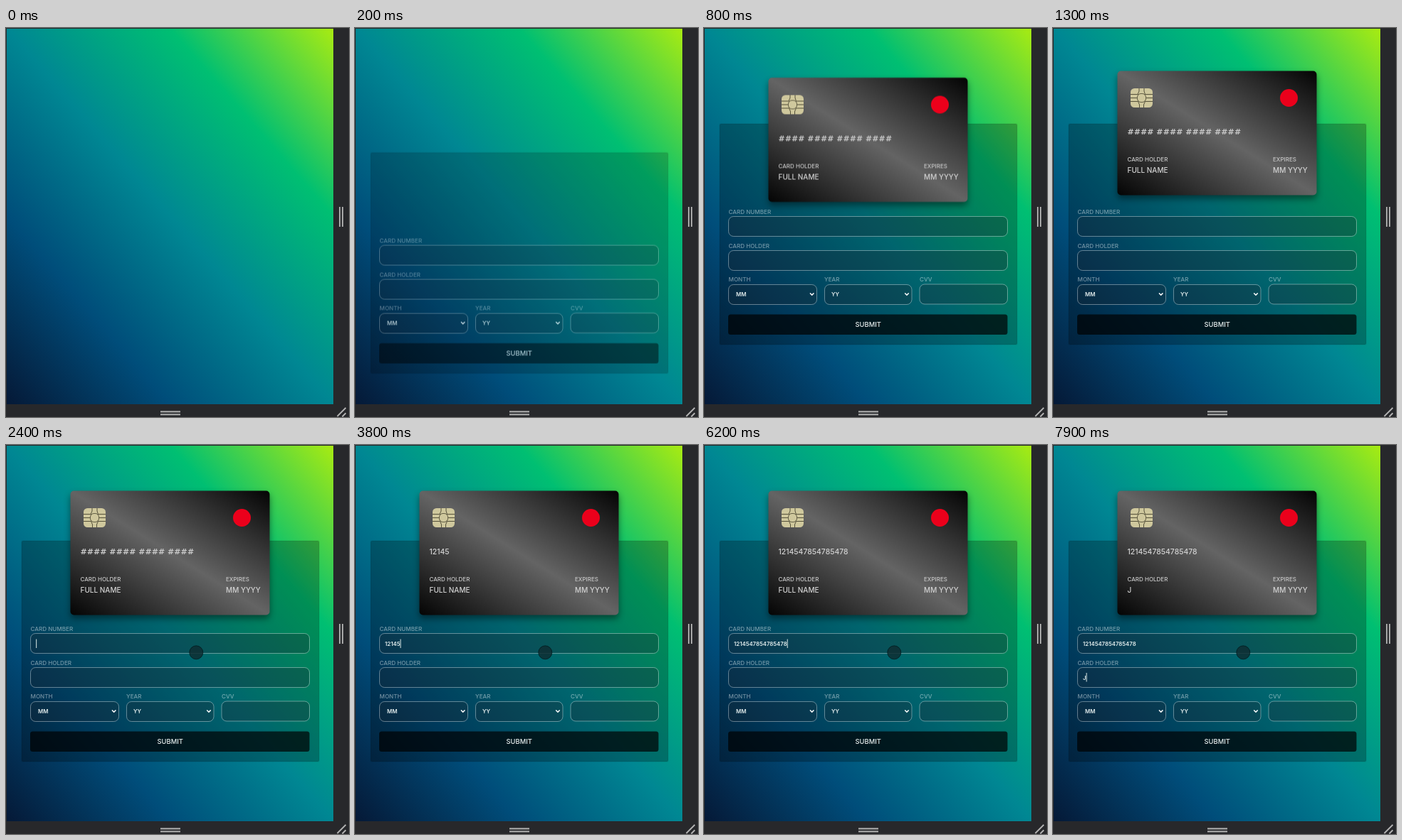
An HTML page that plays this animation: 482x548 px, repeating every 8000 ms.

```html
<!DOCTYPE html>
<html lang="en">
<head>
<meta charset="utf-8">
<title>Card form</title>
<style>
  html, body { margin: 0; width: 100%; height: 100%; overflow: hidden; background: #27282b; }
  svg { display: block; width: 482px; height: 548px; font-family: Inter, sans-serif; font-weight: 500; }
  #card { animation: drop 8s infinite; }
  #form { animation: rise 8s infinite; }
  #pointer { animation: point 8s step-end infinite; }
  .plate { filter: drop-shadow(0 5px 5px rgba(0, 0, 0, .45)); }
  .panel { fill: rgba(0, 0, 0, .25); stroke: rgba(0, 0, 0, .06); stroke-width: 2; }
  .field { fill: rgba(27, 38, 49, .3); stroke: rgba(255, 255, 255, .38); }
  .label { font-size: 8.1px; fill: rgba(255, 255, 255, .45); }
  .tag { font-size: 8px; fill: #c8c8c8; }
  .value { font-size: 10px; fill: #d2d2d2; }
  .input { font-size: 7.8px; font-weight: 600; fill: #e4eeee; }
  .hashes { font: bold 11.05px "DejaVu Sans", sans-serif; fill: #c9c9c9; }
  .digits { font-size: 10.4px; fill: #d2d2d2; }
  .arrow { fill: none; stroke: #fff; stroke-width: 1.6; }
  .grip { fill: none; stroke: #b4b4b4; stroke-width: 1.8; }

  @keyframes drop {
    0%, 2% { transform: translateY(-310px); opacity: .8; animation-timing-function: linear; }
    6.25% { transform: translateY(-159.5px); opacity: .9; animation-timing-function: cubic-bezier(.3, .5, .5, 1); }
    10% { transform: translateY(5.5px); opacity: 1; animation-timing-function: ease-in-out; }
    16.25% { transform: translateY(-4px); animation-timing-function: ease-in-out; }
    21.5%, 100% { transform: none; opacity: 1; }
  }
  @keyframes rise {
    0%, .5% { transform: translateY(150px); opacity: 0; animation-timing-function: cubic-bezier(.2, .6, .35, 1); }
    6.25% { transform: translateY(3.5px); opacity: .96; animation-timing-function: ease-out; }
    9%, 100% { transform: none; opacity: 1; }
  }
  @keyframes point {
    0% { visibility: hidden; }
    24.5%, 100% { visibility: visible; }
  }
</style>
</head>
<body>
<svg viewBox="0 0 482 548">
  <defs>
    <linearGradient id="sky" x1="0" y1="1" x2="1" y2="0">
      <stop offset="0" stop-color="#051937"/>
      <stop offset=".25" stop-color="#004d7a"/>
      <stop offset=".5" stop-color="#008793"/>
      <stop offset=".75" stop-color="#00bf72"/>
      <stop offset="1" stop-color="#a8eb12"/>
    </linearGradient>
    <linearGradient id="metal" x1="0" y1="1" x2="1" y2="0">
      <stop offset="0" stop-color="#040404"/>
      <stop offset=".5" stop-color="#646464"/>
      <stop offset="1" stop-color="#040404"/>
    </linearGradient>
    <clipPath id="view"><rect x="1" y="1" width="459" height="529"/></clipPath>
  </defs>

  <rect width="482" height="548" fill="#27282b"/>
  <g clip-path="url(#view)">
    <rect x="1" y="1" width="459" height="529" fill="url(#sky)"/>

    <g id="form">
      <rect class="panel" x="22" y="135" width="418" height="311" rx="2"/>
      <text class="label" x="34.5" y="262">CARD NUMBER</text>
      <rect class="field" x="34.5" y="265.5" width="392" height="28" rx="7"/>
      <text class="label" x="34.5" y="310">CARD HOLDER</text>
      <rect class="field" x="34.5" y="313.5" width="392" height="28" rx="7"/>
      <text class="label" x="34.5" y="357">MONTH</text>
      <rect class="field" x="34.5" y="361.5" width="124" height="28" rx="7"/>
      <text class="label" x="169" y="357">YEAR</text>
      <rect class="field" x="169.5" y="361.5" width="122.5" height="28" rx="7"/>
      <text class="label" x="303" y="357">CVV</text>
      <rect class="field" x="303" y="361" width="123.5" height="28" rx="7"/>
      <text class="input" x="45" y="378">MM</text>
      <text class="input" x="179" y="378">YY</text>
      <path class="arrow" d="M149 373.5l2.7 2.7 2.7-2.7M282.300 373.5l2.7 2.7 2.7-2.7"/>
      <rect x="34" y="403.500" width="392.500" height="28.500" rx="3.500" fill="rgba(0,0,0,.7)"/>
      <text x="230.700" y="421" text-anchor="middle" font-size="9.4" fill="#e8eeee">SUBMIT</text>
      <text class="input" id="numberInput" x="42" y="283"></text>
      <text class="input" id="holderInput" x="42" y="330.500"></text>
      <rect id="caret" width="1.200" height="12.500" fill="#b9cccd"/>
    </g>

    <g id="card">
      <rect class="plate" x="90.500" y="64.500" width="280" height="175" rx="5" fill="url(#metal)"/>
      <g fill="#cfc89d" stroke="#55513a" stroke-width="1">
        <rect x="109" y="89" width="31" height="27" rx="5.500" stroke="none"/>
        <path fill="none" d="M109 97.500h10.500M109 107.500h10.500M129.500 97.500H140M129.500 107.500H140M109 102.500h9M131 102.500h9M121 89v4l-2 4.500M128 89v4l1.500 4.500M119.500 107.500l2 4.500v4M129.500 107.500l-2 4.500v4"/>
        <rect x="118.500" y="96.500" width="12" height="12" rx="5"/>
      </g>
      <circle cx="331.500" cy="102.500" r="12.500" fill="#eb001b"/>
      <text id="cardNumber" x="104.500" y="154"></text>
      <text class="tag" x="104.500" y="192">CARD HOLDER</text>
      <text class="value" id="cardHolder" x="104.500" y="207.700"></text>
      <text class="tag" x="309" y="192">EXPIRES</text>
      <text class="value" x="309" y="207.700">MM YYYY</text>
    </g>

    <circle id="pointer" cx="267.300" cy="292.300" r="9.500" fill="rgba(14,46,50,.85)" stroke="rgba(0,24,26,.7)"/>
  </g>

  <path class="grip" d="M469 252v28M473 252v28M217 540.500h28M217 544.500h28M465.500 547l12-12M472.500 547.500l5-5"/>
</svg>
<script>
  const LOOP = 8000, BLINK = 530, FOCUS_NUMBER = 2250, FOCUS_HOLDER = 6580, HOLDER_KEY = 7850;
  const NUMBER = '1214547854785478';
  const keyTimes = [2750, 2950, 3150, 3350, 3750, 4050, 4250, 4450, 4650, 4850,
                    5050, 5250, 5450, 5600, 5770, 5940];
  const el = id => document.getElementById(id);
  const setText = (node, text) => { if (node.textContent !== text) node.textContent = text; };

  function placeCaret(input, top, sinceKey) {
    const on = sinceKey >= 0 && sinceKey % (2 * BLINK) < BLINK;
    const width = input.textContent ? input.getComputedTextLength() : 0;
    el('caret').setAttribute('x', 42 + width);
    el('caret').setAttribute('y', top);
    el('caret').style.visibility = on ? 'visible' : 'hidden';
  }

  function draw(t) {
    const typed = keyTimes.filter(time => time <= t).length;
    const digits = NUMBER.slice(0, typed);
    const holder = t >= HOLDER_KEY ? 'J' : '';

    setText(el('numberInput'), digits);
    setText(el('holderInput'), holder);
    setText(el('cardNumber'), digits || '#### #### #### ####');
    el('cardNumber').setAttribute('class', digits ? 'digits' : 'hashes');
    setText(el('cardHolder'), holder || 'FULL NAME');

    if (t < FOCUS_HOLDER) {
      placeCaret(el('numberInput'), 273.5, t - (typed ? keyTimes[typed - 1] : FOCUS_NUMBER));
    } else {
      placeCaret(el('holderInput'), 321, t - (holder ? HOLDER_KEY : FOCUS_HOLDER));
    }
  }

  let start;
  function tick(now) {
    start ??= now;
    draw((now - start) % LOOP);
    requestAnimationFrame(tick);
  }
  draw(0);
  requestAnimationFrame(tick);
</script>
</body>
</html>
```
